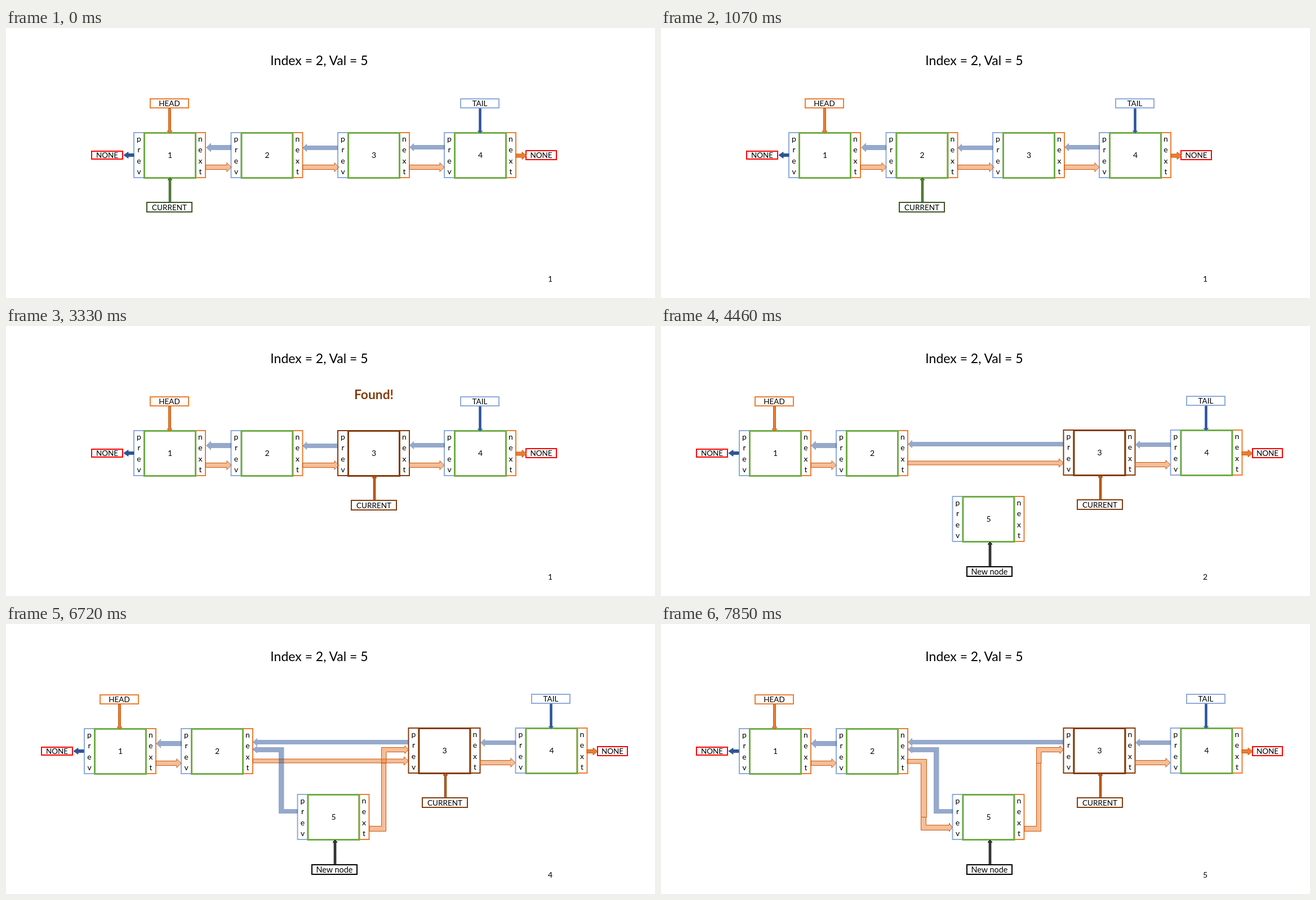
An HTML page for the animation above (8000 ms loop, 1152 px wide and 480 px high).

```html
<!DOCTYPE html>
<html lang="en">
<head>
<meta charset="utf-8">
<title>Linked list insertion</title>
<style>
  html, body { margin: 0; width: 100%; height: 100%; overflow: hidden; background: #fff; }
  svg { display: block; }
  text { font-family: Lato, "Open Sans", sans-serif; text-anchor: middle; }
</style>
</head>
<body>
<svg id="stage" width="1152" height="480" viewBox="0 0 1152 480"></svg>
<script>
const stage = document.getElementById('stage');
const LOOP = 8000;
const CUTS = [1070, 2200, 3330, 4460, 5590, 6720, 7850];

const BLUE = '#8faadc', ORANGE = '#ed7d31', GREEN = '#70ad47', BROWN = '#843c0c', RED = '#ff0000';
const paint = (fill, stroke, opacity = 1) =>
  `fill="${fill}" fill-opacity="${opacity}" stroke="${stroke}" stroke-width="1"`;
const NEXT = paint(ORANGE, '#c55a11', 0.5);
const PREV = paint('#2f5597', 'none', 0.5);
const HEAD = paint(ORANGE, '#c55a11');
const TAIL = paint('#2f5597', '#5b7dbd');
const END = paint('#2f5597', '#2f528f');
const WALK = paint('#548235', '#385723');
const HIT = paint('#c55a11', BROWN);
const FRESH = paint('#404040', '#000');

const rect = (x, y, w, h, color, line = 2) =>
  `<rect x="${x}" y="${y}" width="${w}" height="${h}" fill="none" stroke="${color}" stroke-width="${line}"/>`;
const text = (s, x, y, size = 14, extra = '') =>
  `<text x="${x}" y="${y}" font-size="${size}" ${extra}>${s}</text>`;
const poly = (points, style) => `<polygon points="${points}" ${style}/>`;

// Block arrow from (x1, y1) to (x2, y2)
function arrow(x1, y1, x2, y2, style, shaft = 8, width = 15, tip = 8) {
  const len = Math.hypot(x2 - x1, y2 - y1);
  const ux = (x2 - x1) / len, uy = (y2 - y1) / len;
  const at = (along, side) => `${x1 + ux * along - uy * side},${y1 + uy * along + ux * side}`;
  const s = shaft / 2, w = width / 2, neck = len - tip;
  return poly([at(0, -s), at(neck, -s), at(neck, -w), at(len, 0),
               at(neck, w), at(neck, s), at(0, s)].join(' '), style);
}

const letters = (word, x, y) => [...word].map((c, i) => text(c, x, y + i * 19.4)).join('');

function node(value, x, y, found) {
  return rect(x + 1, y + 1, 18, 80, found ? BROWN : BLUE) +
    rect(x + 110, y + 1, 18, 80, found ? BROWN : ORANGE) +
    rect(x + 19.5, y + 1.5, 91, 80, found ? BROWN : GREEN, 3) +
    letters('prev', x + 10, y + 17) +
    letters('next', x + 119, y + 17) +
    text(value, x + 65, y + 46);
}

const label = (s, x, y, w, h, color, size = 13.5) =>
  rect(x, y, w, h, color) + text(s, x + w / 2, y + h / 2 + 5, size);

const topPointer = (s, x, y, color, style) =>
  label(s, x, y, 68, 16, color) + arrow(x + 34.5, y + 17, x + 34.5, y + 61, style, 4, 9, 4);

const lowPointer = (s, x, y, color, style, size) =>
  label(s, x, y, 80, 17, color, size) + arrow(x + 41, y, x + 41, y - 44, style, 3.5, 8, 4);

function listBefore(step) {
  const found = step === 3;
  return node(1, 226, 185) + node(2, 398.5, 185) + node(3, 588, 185, found) + node(4, 777, 185) +
    topPointer('HEAD', 256, 126, ORANGE, HEAD) +
    topPointer('TAIL', 807, 126, BLUE, TAIL) +
    label('NONE', 152, 219, 55, 14, RED) +
    label('NONE', 923, 218, 54, 16, RED) +
    arrow(227, 226, 209, 226, END, 5, 11) +
    arrow(905, 227, 924, 227, HEAD, 6, 13) +
    arrow(400, 212.5, 355, 212.5, PREV, 9, 17, 9) +
    arrow(589, 213, 526, 213, PREV) +
    arrow(779, 212, 716, 212, PREV) +
    arrow(354.5, 247.5, 400, 247.5, NEXT, 8, 16) +
    arrow(526.5, 247.5, 591, 247.5, NEXT, 8, 16) +
    arrow(715.5, 247.5, 778, 247.5, NEXT, 8, 16) +
    lowPointer('CURRENT', [250, 423, 613, 613][step], 310, found ? BROWN : '#385723', found ? HIT : WALK) +
    (found ? text('Found!', 653, 130, 22.8, `font-weight="700" fill="${BROWN}"`) : '');
}

const newNext = () =>
  poly('645,359.5 666.5,359.5 666.5,247.5 674.5,247.5 674.5,368.5 645,368.5', NEXT) +
  poly('666.5,247.5 666.5,219.5 708,219.5 708,216.5 714,223.5 708,230.5 708,227.5 675,227.5 675,247.5', NEXT);

const newPrev = () =>
  poly('518,329 493.5,329 493.5,219 446,219 446,216.5 437,223 446,230 446,228 484,228 484,337 518,337', PREV);

const oldNext = () =>
  poly('437,240.5 471.5,240.5 471.5,343.5 461.5,343.5 461.5,248 437,248', NEXT) +
  poly('461.5,343.5 461.5,366.5 511.5,366.5 511.5,369 517,361.5 511.5,354 511.5,357.5 470.5,357.5 470.5,343.5', NEXT);

function listAfter(step) {
  return node(1, 138, 185) + node(2, 310, 185) + node(3, 713.5, 184, true) +
    node(4, 903.5, 184) + node(5, 516.5, 302) +
    topPointer('HEAD', 167, 126, ORANGE, HEAD) +
    topPointer('TAIL', 933, 125, BLUE, TAIL) +
    label('NONE', 63, 219, 55, 14, RED) +
    label('NONE', 1050, 218, 53, 16, RED) +
    arrow(138, 226, 120, 226, END, 5, 11) +
    arrow(1031, 226.5, 1050, 226.5, HEAD, 6, 13) +
    arrow(312, 212.5, 266, 212.5, PREV, 9, 17, 9) +
    arrow(715, 210, 438, 210, PREV) +
    arrow(905, 211, 842, 211, PREV) +
    arrow(266.5, 247.5, 311, 247.5, NEXT, 8, 16) +
    arrow(841.5, 246.5, 904, 246.5, NEXT, 8, 16) +
    (step < 7 ? arrow(438, 243.5, 714.5, 243.5, NEXT, 7, 15) : oldNext()) +
    (step > 4 ? newNext() : '') +
    (step > 5 ? newPrev() : '') +
    lowPointer('CURRENT', 739, 309, BROWN, HIT) +
    lowPointer('New node', 543, 428, '#000', FRESH, 14.4);
}

function draw(step) {
  stage.innerHTML = text('Index = 2, Val = 5', 556, 66, 23) +
    (step < 4 ? listBefore(step) : listAfter(step)) +
    text(Math.max(1, step - 2), 966, 451);
}

let shown = -1;
const start = performance.now();
function tick() {
  const t = (performance.now() - start) % LOOP;
  const step = CUTS.filter(cut => t >= cut).length;
  if (step !== shown) draw(shown = step);
  requestAnimationFrame(tick);
}
tick();
</script>
</body>
</html>
```
